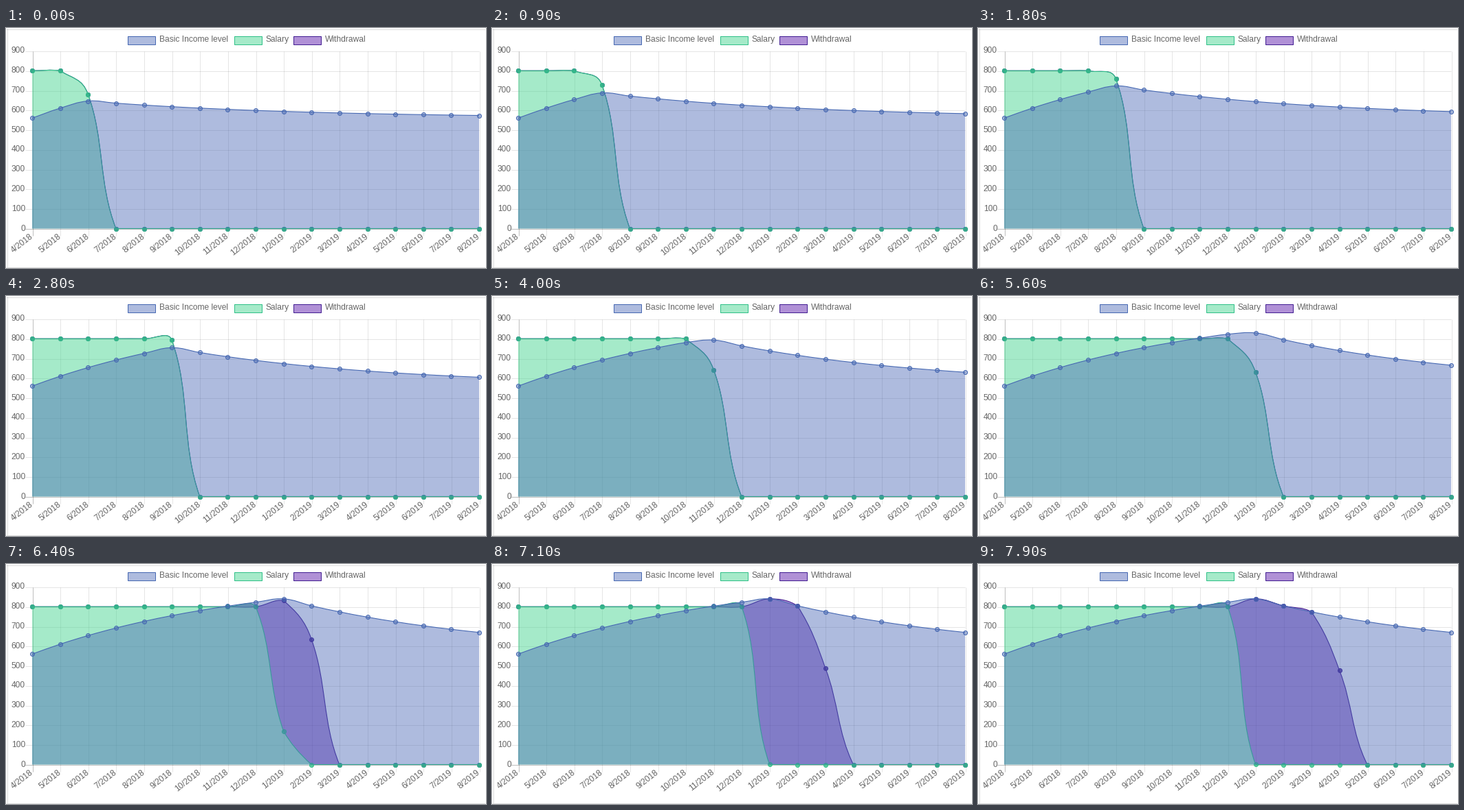
A matplotlib script for the animation above (8 s loop, 698x350 px).

```python
import numpy as np
import matplotlib.pyplot as plt
from matplotlib.animation import FuncAnimation
from matplotlib.patches import PathPatch, Rectangle
from matplotlib.path import Path

W, H, DPI = 698, 350, 100
PX = 72 / DPI
LEFT, RIGHT, TOP, BOTTOM = 38, 688, 33.5, 292.5
N, TENSION, DURATION = 17, 0.4, 1000
FRAMES, INTERVAL = 80, 100
LAST_PAID = 8

# When each new month is added, in ms; the first one belongs to month index 2.
STARTS = [-379, 448, 1277, 2106, 2890, 3667, 4470, 5279, 6078, 6880, 7675]

TEXT = "#666666"
BLUE, GREEN, PURPLE = ((r / 255, g / 255, b / 255) for r, g, b in
                       [(70, 104, 178), (48, 192, 136), (66, 30, 146)])
SERIES = [  # label, line, area, point fill, legend x
    ("Basic Income level", BLUE, (69 / 255, 99 / 255, 180 / 255, 0.43), (*BLUE, 0.45), 176.5),
    ("Salary", GREEN, (77 / 255, 215 / 255, 149 / 255, 0.5), (*GREEN, 0.75), 331.5),
    ("Withdrawal", PURPLE, (99 / 255, 35 / 255, 175 / 255, 0.5), (*PURPLE, 0.8), 417.5),
]

xs = np.linspace(LEFT, RIGHT, N)


def to_y(value):
    return BOTTOM - np.asarray(value) * (BOTTOM - TOP) / 900


def month_values(k):
    """Level, salary and withdrawal once month k has been added."""
    level = [560.0]
    for i in range(N - 1):
        level.append(560 + 0.875 * (level[-1] - 560) + 50 * (i < min(k, LAST_PAID + 1)))
    level = np.array(level)
    idx = np.arange(N)
    paid = k if k <= LAST_PAID + 1 else LAST_PAID
    salary = np.where(idx <= paid, 800.0, 0.0)
    drawn = np.where((idx > paid) & (idx <= k), level, 0.0)
    return level, salary, salary + drawn


def spline(values):
    """Rows of (point, control before, control after) for a smoothed line."""
    pts = np.column_stack([xs, to_y(values)])
    prev = np.vstack([pts[:1], pts[:-1]])
    nxt = np.vstack([pts[1:], pts[-1:]])
    d0 = np.hypot(*(pts - prev).T)
    d1 = np.hypot(*(nxt - pts).T)
    span = nxt - prev
    before = pts - span * (TENSION * d0 / (d0 + d1))[:, None]
    after = pts + span * (TENSION * d1 / (d0 + d1))[:, None]
    lo, hi = (LEFT, TOP), (RIGHT, BOTTOM)
    return np.stack([pts, before.clip(lo, hi), after.clip(lo, hi)], axis=1)


def target(k):
    return np.stack([spline(v) for v in month_values(k)])


def mix(a, b, elapsed):
    t = min(elapsed / DURATION, 1)
    return a + (b - a) * (1 - (1 - t) ** 4)


targets = [target(k + 2) for k in range(len(STARTS))]
origins = [target(1)]
for k in range(len(STARTS) - 1):
    origins.append(mix(origins[k], targets[k], STARTS[k + 1] - STARTS[k]))


def pose(ms):
    k = max(i for i, start in enumerate(STARTS) if start <= ms)
    return mix(origins[k], targets[k], ms - STARTS[k])


def curve(s):
    """Bezier vertices through the whole series."""
    parts = [s[:1, 0]]
    for a, b in zip(s[:-1], s[1:]):
        parts.append(np.array([a[2], b[1], b[0]]))
    return np.vstack(parts)


CURVE_CODES = [Path.CURVE4] * (3 * (N - 1))


def line_path(verts):
    return Path(verts, [Path.MOVETO] + CURVE_CODES)


def area_to_base(verts):
    base = [(RIGHT, BOTTOM), (LEFT, BOTTOM), verts[0]]
    codes = [Path.MOVETO] + CURVE_CODES + [Path.LINETO] * 2 + [Path.CLOSEPOLY]
    return Path(np.vstack([verts, base]), codes)


def area_between(verts, other):
    codes = [Path.MOVETO] + CURVE_CODES + [Path.LINETO] + CURVE_CODES
    return Path(np.vstack([verts, other[::-1]]), codes)


fig = plt.figure(figsize=(W / DPI, H / DPI), dpi=DPI, facecolor="white")
ax = fig.add_axes([0, 0, 1, 1])
ax.set_xlim(0, W)
ax.set_ylim(H, 0)
ax.axis("off")
plt.rcParams["font.family"] = "Liberation Sans"


def rule(x, y, alpha):
    ax.plot(x, y, color=(0, 0, 0, alpha), lw=PX, solid_capstyle="butt", zorder=1)


def label(x, y, s, **kw):
    ax.text(x, y, s, size=12 * PX, color=TEXT, va="center", **kw)


# Dotted frame
for x, y in [((1, 697), (1.5, 1.5)), ((1, 697), (348.5, 348.5)),
             ((1.5, 1.5), (1, 349)), ((697.5, 697.5), (1, 349))]:
    ax.plot(x, y, color="#bbbbbb", lw=PX, ls=(0, (1, 1)), dash_capstyle="butt")

# Grid and axis labels
for v in range(0, 1000, 100):
    y = np.floor(to_y(v)) + 0.5
    rule((LEFT - 10, RIGHT), (y, y), 0.1 if v else 0.25)
    label(LEFT - 10, to_y(v), str(v), ha="right")
for i, x in enumerate(xs):
    gx = np.floor(x) + 0.5
    rule((gx, gx), (TOP, BOTTOM + 10), 0.1 if i else 0.25)
    month = i + 3
    label(x, BOTTOM + 10, f"{month % 12 + 1}/{2018 + month // 12}", ha="right",
          rotation=38, rotation_mode="anchor")

# Legend
for name, line, area, _, x in SERIES:
    ax.add_patch(Rectangle((x, 11.5), 40, 12, fc=area, ec=line, lw=PX))
    label(x + 46.3, 17.3, name, ha="left")

# Series, the first one on top
areas, lines, dots = [], [], []
blank = Path([(0, 0), (0, 0)])
for n, (_, line, area, fill, _) in enumerate(SERIES):
    z = 10 - 3 * n
    areas.append(ax.add_patch(PathPatch(blank, fc=area, ec="none", lw=0, zorder=z)))
    lines.append(ax.add_patch(PathPatch(blank, fc="none", ec=line, lw=1.1 * PX, zorder=z + 1)))
    dots += ax.plot([], [], "o", ms=6 * PX, mew=PX, mfc=fill, mec=line, zorder=z + 2)


def draw(i):
    view = pose(i * INTERVAL)
    verts = [curve(s) for s in view]
    shapes = [area_to_base(verts[0]), area_to_base(verts[1]),
              area_between(verts[2], verts[1])]
    for n in range(3):
        areas[n].set_path(shapes[n])
        lines[n].set_path(line_path(verts[n]))
        dots[n].set_data(view[n, :, 0, 0], view[n, :, 0, 1])
    return areas + lines + dots


anim = FuncAnimation(fig, draw, frames=FRAMES, interval=INTERVAL,
                     repeat=True, repeat_delay=0, blit=False)
plt.show()
```
